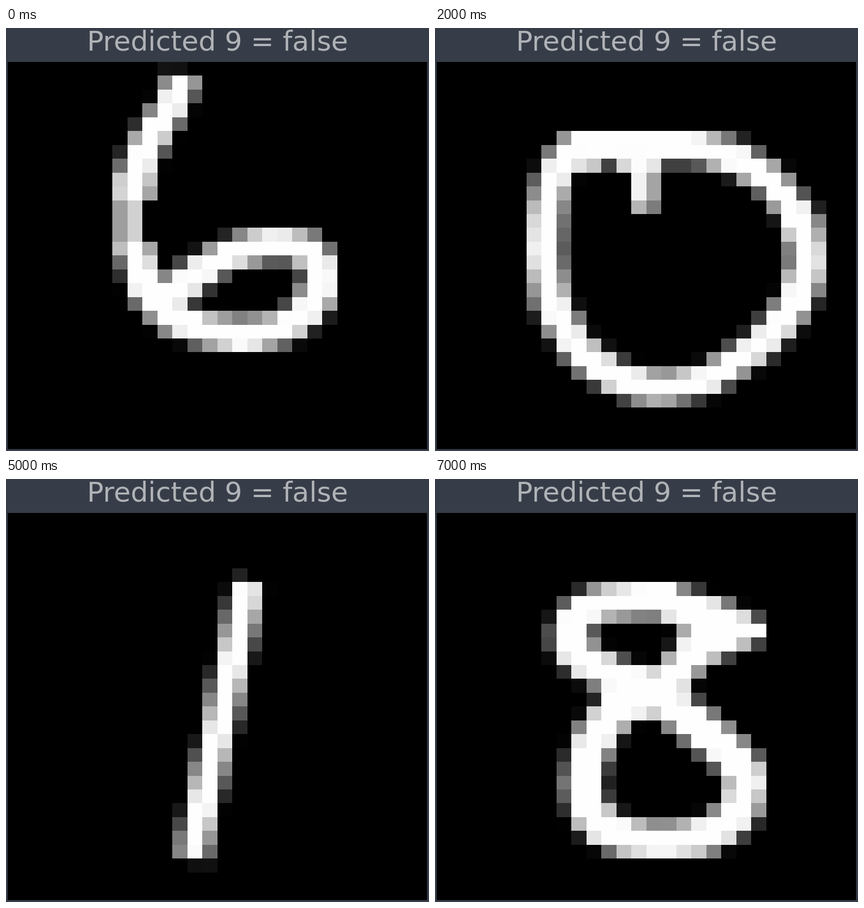
An HTML page with a canvas that plays this animation: 748 by 748 pixels, repeating every 8000 ms.

```html
<!DOCTYPE html>
<html lang="en">
<head>
<meta charset="utf-8">
<title>Digit prediction</title>
<style>
  html, body { margin: 0; width: 100%; height: 100%; overflow: hidden; background: #373d48; }
  canvas { display: block; }
</style>
</head>
<body>
<canvas id="stage" width="748" height="748"></canvas>
<script>
const GRID = 28;
const HOLD = 1000;
const PLOT = { x: 3, y: 60, w: 741.5, h: 684.6 };

// Each digit is handwriting on a 28 x 28 grid; antialiasing gives the grey edges.
function makeDigit(write) {
  const tile = document.createElement('canvas');
  tile.width = tile.height = GRID;
  const pen = tile.getContext('2d');
  pen.fillStyle = pen.strokeStyle = '#fefefe';
  const stroke = (width, path, cap = 'butt') => {
    pen.lineWidth = width;
    pen.lineCap = cap;
    pen.lineJoin = 'round';
    pen.stroke(new Path2D(path));
  };
  const fill = path => pen.fill(new Path2D(path), 'evenodd');
  write(stroke, fill);
  return tile;
}

const slantedSix = makeDigit(stroke => {
  stroke(2.2, 'M11.8 1 Q11 3.5 9.8 5 T8.5 10');
  stroke(1.45, 'M8.1 8 V13.5');
  stroke(2.3, 'M8.4 13 Q8.5 16.5 11 18.5 C14 20.4 18.5 20.1 20 18 S21.5 13.2 18 13.2 13 14.8 10.3 17.3');
});

const seven = makeDigit(stroke => {
  stroke(2.2, 'M7.5 8.6 Q13 9.6 18.5 8.5 17.5 14 12.9 27');
});

const zero = makeDigit(stroke => {
  stroke(2.3, `M9.2 6.1 H17.3 C20.5 6.4 24.8 9.5 24.8 14 S19.5 23.6 15 23.6
    C10.2 23.6 7.2 19 7.2 14 S7.8 7 9.2 6.1 Z`);
  stroke(1.6, 'M13.85 6 V10.7');
  stroke(0.9, 'M8.5 7.4 H10.9 M12 7.4 H14.8');
});

const three = makeDigit(stroke => {
  stroke(4.8, 'M12.1 8.5 Q15.5 5.9 18 7.8 20.6 9.5 20.5 11 20.5 13 18 13.7', 'round');
  stroke(4.7, 'M13.2 13.9 H18.5 Q19.8 14 19.8 16 V19 Q19.8 20.6 16.5 20.8 11.5 20.8 5.4 16.8', 'round');
});

const nine = makeDigit((stroke, fill) => {
  fill(`M13 6 H17 L18 8.5 V11 L17.4 13 H13.1 L10.5 13.9 7.9 13 7.6 11.5 9 8.9 10 7 Z
    M12 9.4 H14 V10 L13.4 10.3 V11 H11.8 Z`);
  stroke(4.3, 'M15.3 13 V23');
  stroke(3.6, 'M14.95 23 V26');
});

const one = makeDigit(stroke => {
  stroke(2, 'M16.1 5 L12.3 25');
});

const wideSix = makeDigit(stroke => {
  stroke(2.2, `M18.3 4 H15.5 C13.8 4.4 12 6.5 10.2 8.4 S7.1 12.5 7.1 15.5 8 19 10 20.2
    15 21.5 16 21.5 22.9 21 22.9 17 C22.9 14.8 20.5 14.6 18 14.6 S12.5 15 11.5 18.5 L10.5 20`);
  stroke(2.9, 'M15 14.8 Q18 14.4 21 14.6');
  stroke(1.2, 'M17.6 4 V5.8');
});

const eight = makeDigit((stroke, fill) => {
  stroke(2.6, 'M14 12.6 C10.5 11.5 8.9 10.5 8.9 9 S10.5 6.3 13.5 6.3 H16');
  stroke(2.6, `M13.5 13.2 C11.5 14.5 9.8 17 9.8 19.8 S11.2 23.7 15 23.7 20.7 22.5 20.7 19.2
    C20.3 17 16.5 15 14.5 12.8`);
  fill('M15 5.1 L19 6.2 22 8 V9 L18 11 16.8 12.5 V13.5 L13 15 11 14.5 V12.5 L15 11 16.6 8.5 15 7.5 Z');
});

const slides = [slantedSix, seven, zero, three, nine, one, wideSix, eight];
const ctx = document.getElementById('stage').getContext('2d');
const start = performance.now();

function draw() {
  const elapsed = performance.now() - start;
  const digit = slides[Math.floor(elapsed / HOLD) % slides.length];

  ctx.fillStyle = '#373d48';
  ctx.fillRect(0, 0, 748, 748);

  ctx.fillStyle = '#b0b3b7';
  ctx.font = '48.6px "DejaVu Sans", sans-serif';
  ctx.textAlign = 'center';
  ctx.fillText(`Predicted 9 = ${digit === nine}`, 374, 39.5);

  ctx.fillStyle = '#000';
  ctx.fillRect(PLOT.x, PLOT.y, PLOT.w, PLOT.h);
  ctx.imageSmoothingEnabled = false;
  ctx.drawImage(digit, PLOT.x, PLOT.y, PLOT.w, PLOT.h);

  requestAnimationFrame(draw);
}
draw();
</script>
</body>
</html>
```
